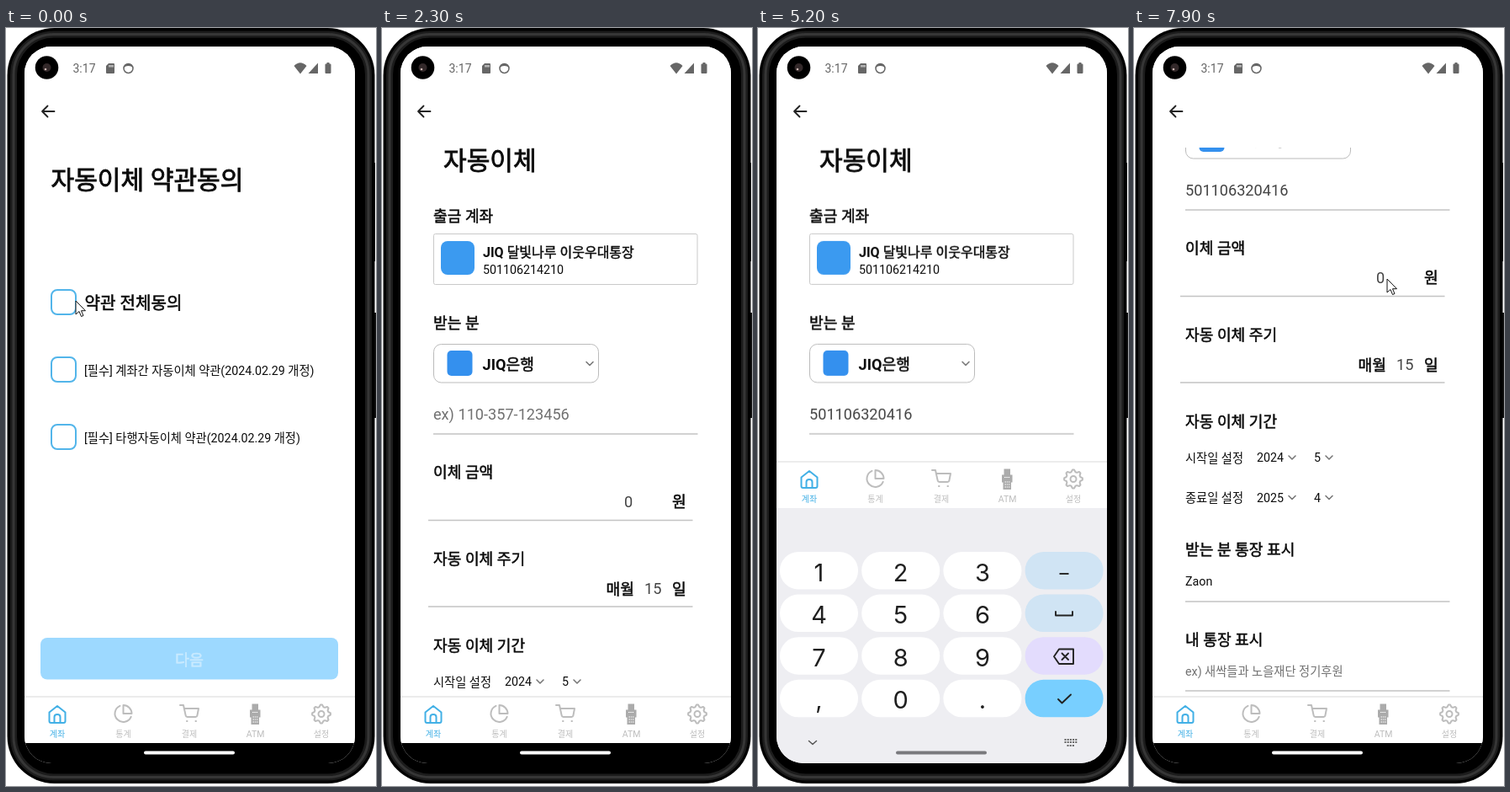
Animation of 440 by 900 pixels, one loop 8000 ms. Source, as an HTML page:

```html
<!DOCTYPE html>
<html lang="ko">
<head>
<meta charset="utf-8">
<title>자동이체</title>
<style>
html, body { margin: 0; width: 100%; height: 100%; overflow: hidden; background: #fff; }
svg { display: block; width: 440px; height: 900px; font-family: Roboto, "Noto Sans CJK KR", "Noto Sans CJK", sans-serif; }
text { --ink: #0c0c0c; fill: var(--ink); white-space: pre; }
/* Medium weight: regular glyphs with a thin outline */
.medium { stroke: var(--ink); stroke-width: .028em; }
.medium tspan { font-weight: 700; stroke: none; }
.s30 { font-size: 30.1px; }
.s20 { font-size: 20.1px; }
.s18 { font-size: 18.15px; }
.s16 { font-size: 16px; }
.s14 { font-size: 14.25px; }
.thin { font-size: 18.15px; --ink: #444; }
.hint { --ink: #717171; }
.next { font-size: 18.5px; --ink: #fff; }
.off { --ink: #c9eaff; }
.mid { text-anchor: middle; }
.key { font: 29px Inter, Roboto, sans-serif; --ink: #1f1f1f; }
.rule { stroke: #c4c4c4; stroke-width: 1.3; }
.line { fill: none; stroke-linecap: round; stroke-linejoin: round; }
.box { fill: #fff; stroke: #c9c9c9; }
.tab { font-size: 10px; text-anchor: middle; --ink: #bdbdbd; }
.active { --ink: #42b0e6; }

.anim, .cursor { animation: 8s linear infinite; }
.step { animation-timing-function: step-end; }
.tick { animation-name: tick; }
.press { animation-name: press; }
.form { animation-name: form; }
.scroll { animation-name: scroll; }
.hint-in { animation-name: hint; }
.typed { animation-name: typed; }
.caret { animation-name: caret; }
.resize { animation-name: resize; }
.tabs { animation-name: tabs; }
.keyboard { animation-name: keyboard; }
.chip { animation-name: chip; }
.handle { animation-name: handle; }
.cursor { animation-name: move, seen; animation-timing-function: linear, step-end; }

@keyframes tick { 0% { opacity: 0 } 1.875%, 100% { opacity: 1 } }
@keyframes press { 0%, 17% { opacity: 1 } 18.5%, 20% { opacity: .5 } 21.25%, 100% { opacity: 1 } }
@keyframes form { 0%, 20.6% { opacity: 0 } 25.6%, 100% { opacity: 1 } }
@keyframes scroll {
  0%, 65% { transform: translateY(0); animation-timing-function: cubic-bezier(.3, .1, .3, 1) }
  72.5%, 100% { transform: translateY(-266px) }
}
@keyframes hint { 0% { opacity: 1 } 57.5%, 100% { opacity: 0 } }
@keyframes typed { 0% { opacity: 0 } 57.5%, 100% { opacity: 1 } }
@keyframes caret {
  0% { opacity: 0; transform: translateX(-122px) }
  43.75% { opacity: 1; transform: translateX(-122px) }
  50% { opacity: 0; transform: translateX(-122px) }
  57.5% { opacity: 1; transform: none }
  62.5% { opacity: 0; transform: none }
  68.75% { opacity: 1; transform: none }
  75.6% { opacity: 0; transform: none }
  81.25% { opacity: 1; transform: none }
  87.5%, 100% { opacity: 0; transform: none }
}
@keyframes resize { 0% { opacity: 0 } 43.125% { opacity: 1 } 91.875%, 100% { opacity: 0 } }
@keyframes tabs {
  0% { transform: translateY(0) }
  43.125% { transform: translateY(-279px) }
  89.375%, 100% { transform: translateY(0) }
}
@keyframes keyboard {
  0%, 43.125% { opacity: 0; transform: translateY(60px) }
  47.5%, 88.75% { opacity: 1; transform: translateY(0) }
  90% { opacity: .74; transform: translateY(15px) }
  92.5%, 100% { opacity: 0; transform: translateY(60px) }
}
@keyframes chip { 0% { opacity: 0 } 49.4% { opacity: 1 } 57.5%, 100% { opacity: 0 } }
@keyframes handle {
  0%, 43.125% { fill: #fff }
  47.5%, 58.75% { fill: #b9b9bd }
  67.5%, 90% { fill: #5f5f63 }
  93.75%, 100% { fill: #fff }
}
@keyframes move {
  0%, 3.75% { transform: translate(83px, 324px); animation-timing-function: ease-in-out }
  11.25%, 21.25% { transform: translate(227px, 751px) }
  42%, 45% { transform: translate(215px, 445px); animation-timing-function: ease-in-out }
  52.5%, 62.5% { transform: translate(218px, 579px) }
  78%, 79% { transform: translate(165px, 630px) }
  82.5% { transform: translate(355px, 420px) }
  86.25%, 93.75% { transform: translate(305px, 311px) }
  97.5% { transform: translate(304px, 304px) }
  98.75%, 100% { transform: translate(301px, 298px) }
}
@keyframes seen {
  0% { opacity: 1 } 21.25% { opacity: 0 } 42.5% { opacity: 1 }
  62.5% { opacity: 0 } 78.75%, 100% { opacity: 1 }
}
</style>
</head>
<body>
<svg viewBox="0 0 440 900">
  <defs>
    <clipPath id="screen"><rect x="22" y="22" width="393" height="851" rx="32"/></clipPath>
    <path id="down" class="line" d="M-4-2L0 2L4-2" stroke="#777" stroke-width="1.6"/>
  </defs>

  <!-- phone body -->
  <path d="M437 160h2v117h-2zM437 338h3v125h-3z" fill="#111"/>
  <rect x="1.5" width="437" height="897" rx="56" fill="#000"/>
  <g fill="none">
    <rect x="9" y="7.5" width="422" height="882" rx="48" stroke="#1c1c1c" stroke-width="8"/>
    <rect x="9" y="7.5" width="422" height="882" rx="48" stroke="#363636" stroke-width="3"/>
  </g>

  <g clip-path="url(#screen)">
    <rect x="22" y="22" width="393" height="851" fill="#fff"/>

    <!-- terms page -->
    <text class="s30 medium" x="53.500" y="191">자동이체 약관동의</text>
    <g id="boxes"></g>
    <text class="s20 medium" x="93.500" y="333.5">약관 전체동의</text>
    <text class="s14" x="93" y="412">[필수] 계좌간 자동이체 약관(2024.02.29 개정)</text>
    <text class="s14" x="93" y="492">[필수] 타행자동이체 약관(2024.02.29 개정)</text>
    <rect x="41" y="724" width="354" height="49.5" rx="8" fill="#9dd9ff"/>
    <text class="next off medium mid" x="218" y="756.5">다음</text>
    <g class="anim step tick"><g class="anim press">
      <rect x="41" y="724" width="354" height="49.5" rx="8" fill="#42b4ff"/>
      <text class="next medium mid" x="218" y="756.5">다음</text>
    </g></g>

    <!-- transfer form -->
    <g class="anim form">
      <rect x="22" y="120" width="393" height="674" fill="#fff"/>
      <g class="anim scroll">
        <text class="s30 medium" x="73" y="168">자동이체</text>
        <text class="s18 medium" x="61" y="229.5">출금 계좌</text>
        <rect class="box" x="61.5" y="244.5" width="313.5" height="60" rx="2"/>
        <rect x="70" y="253" width="40" height="40" rx="8" fill="#3b9af0"/>
        <text class="s16 medium" x="120" y="271.5"><tspan>JIQ</tspan> 달빛나루 이웃우대통장</text>
        <text class="s14" x="120" y="292.3">501106214210</text>
        <text class="s18 medium" x="61" y="357">받는 분</text>
        <rect class="box" x="61.5" y="375.5" width="196" height="45.5" rx="9" style="stroke:#bbb"/>
        <rect x="77.5" y="383" width="30" height="30" rx="5" fill="#3490ee"/>
        <text class="s18 medium" x="119.5" y="406"><tspan>JIQ</tspan>은행</text>
        <use href="#down" x="247" y="398.5"/>
        <text class="thin hint anim step hint-in" x="61" y="464.5">ex) 110-357-123456</text>
        <text class="thin anim step typed" x="61" y="465">501106320416</text>
        <rect class="anim step caret" x="183" y="444" width="2.2" height="28" fill="#25c3c8"/>
        <path class="rule" d="M61 482H375.500M55 584.500H369.500M55 687H369.500M61 947H375.500M61 1053H375.500"/>
        <text class="s18 medium" x="61" y="533.5">이체 금액</text>
        <text class="thin" x="288" y="569">0</text>
        <text class="s18 medium" x="345" y="569">원</text>
        <text class="s18 medium" x="61" y="637">자동 이체 주기</text>
        <text class="s18 medium" x="266.500" y="672.5">매월</text>
        <text class="thin" x="312" y="672">15</text>
        <text class="s18 medium" x="345" y="672.5">일</text>
        <text class="s18 medium" x="61" y="739.5">자동 이체 기간</text>
        <text class="s14" x="61" y="782">시작일 설정</text>
        <text class="s14" x="146" y="781">2024</text><use href="#down" x="188" y="776"/>
        <text class="s14" x="214" y="781">5</text><use href="#down" x="232" y="776"/>
        <text class="s14" x="61" y="829">종료일 설정</text>
        <text class="s14" x="146" y="828.5">2025</text><use href="#down" x="188" y="823.5"/>
        <text class="s14" x="214" y="828.5">4</text><use href="#down" x="232" y="823.5"/>
        <text class="s18 medium" x="61" y="892">받는 분 통장 표시</text>
        <text class="s14" x="61" y="928">Zaon</text>
        <text class="s18 medium" x="61" y="998.5">내 통장 표시</text>
        <text class="s14 hint" x="61" y="1035">ex) 새싹들과 노을재단 정기후원</text>
      </g>
    </g>

    <!-- header -->
    <rect x="22" y="22" width="393" height="120" fill="#fff"/>
    <path class="line" d="M57.500 99H43M49.500 92.500L43 99L49.500 105.500" stroke="#222" stroke-width="1.8"/>
    <circle cx="48.500" cy="47" r="13.800"/>
    <circle cx="48.500" cy="47" r="5" fill="#33292a"/>
    <circle cx="47" cy="49" r="1.300" fill="#c9b5b0"/>
    <g fill="#666">
      <text x="79.500" y="53" font-size="14" style="--ink:#666">3:17</text>
      <path d="M122 42h6q1 0 1 1v10q0 1-1 1h-8q-1 0-1-1v-8z"/>
      <path d="M350 54.500L342.500 45Q350 37.500 357.500 45zM371 41.500V54H359.500zM380.500 42.500h1v-1.500h3v1.500h1q1 0 1 1v9.500q0 1-1 1h-5q-1 0-1-1v-9.500q0-1 1-1z"/>
      <path d="M123 44v2.500M125 44v2.500M127 44v2.500" stroke="#fff"/>
      <circle cx="145.500" cy="48" r="5.500" fill="none" stroke="#666" stroke-width="1.500"/>
      <path d="M140 48a5.500 5.500 0 0 1 11 0q-1-3-5.500-3t-5.500 3z"/>
    </g>

    <rect class="anim step resize" x="22" y="515" width="393" height="334" fill="#f1f1f1"/>
    <rect x="22" y="849" width="393" height="24"/>

    <!-- tab bar -->
    <g class="anim step tabs">
      <rect x="22" y="793" width="393" height="2" fill="#ececec"/>
      <rect x="22" y="795" width="393" height="54" fill="#fff"/>
      <g class="line" stroke="#bdbdbd" stroke-width="2">
        <path transform="translate(49 803)" stroke="#42b0e6" d="M2.500 9.500L12 2l9.500 7.500V20q0 2-2 2h-15q-2 0-2-2zM8.500 22v-7q0-3 3.500-3t3.500 3v7"/>
        <path transform="translate(127.500 802)" d="M21.200 15.900A10 10 0 1 1 8 2.800M22 12A10 10 0 0 0 12 2v10z"/>
        <path transform="translate(206 802)" d="M1 2h4l2.700 12.400q.3 1.600 2 1.600h9.700q1.700 0 2-1.600L23 6H6M9 21h.5M19.500 21h.5"/>
        <path id="gear"/>
        <circle cx="375" cy="814.500" r="3.500"/>
      </g>
      <path d="M292.500 802.500h7.500v7h2.500v9h-1.500v8.500h-9.500v-8.500h-1.500v-9h2.500z" fill="#ababab"/>
      <path d="M293 812.500h7M293.500 818h6M293.500 821h6M293.500 824h6" stroke="#fff" stroke-width="1.200" stroke-dasharray="1.500 .8"/>
      <text class="tab active" x="61" y="841.500">계좌</text>
      <text class="tab" x="139.500" y="841.500">통계</text>
      <text class="tab" x="218" y="841.500">결제</text>
      <text class="tab" x="296.500" y="841.500" style="font-size:10.500px">ATM</text>
      <text class="tab" x="375" y="841.500">설정</text>
    </g>

    <!-- keyboard -->
    <g class="anim keyboard">
      <rect x="22" y="570" width="393" height="310" fill="#eeeef2"/>
      <g class="anim step chip">
        <rect x="132" y="571" width="138" height="42" fill="#e6e6e9"/>
        <rect x="132.500" y="576.500" width="137" height="31" rx="7" fill="#f0f0f2" stroke="#c6c6ca"/>
        <path class="line" d="M142 592v-6h3M153 586h3v6M142 598v2h2M146 585h6v3h-6z" stroke="#4aaee6" stroke-width="1.600"/>
        <text x="143.500" y="599" font-size="8" font-weight="700" style="--ink:#4aaee6">123</text>
        <text class="key" x="163.500" y="597.500" style="font-size:13.400px">501106320416</text>
      </g>
      <g id="keys"></g>
      <g class="line" stroke="#222" stroke-width="1.900">
        <path d="M358.500 648h11" stroke-linecap="butt"/>
        <path d="M354 693v4.500h20V693"/>
        <path d="M358 737.500h17v17.500h-17l-6-8.700zM361.500 742.500l7.500 7.500M369 742.500l-7.500 7.500"/>
        <path d="M357 797l4.500 4.500L372 791.500"/>
      </g>
      <path class="line" d="M60.500 846.500l4.500 4 4.500-4" stroke="#555" stroke-width="1.500"/>
      <path d="M364.500 845h15M364.500 848h15M367.500 852h9" stroke="#666" stroke-width="2" stroke-dasharray="2 1.200"/>
    </g>
    <rect class="anim handle" x="164" y="858.500" width="108" height="4" rx="2"/>
  </g>

  <path class="cursor" d="M0 0V16L4 12.500L6.500 18.500L9 17.500L6.500 11.700H11.500Z" fill="#fff" stroke="#111"/>
</svg>
<script>
const put = (id, html) => { document.getElementById(id).innerHTML = html; };

put('boxes', [311, 391, 471].map(y => `
  <rect x="54" y="${y}" width="29" height="29" rx="7" fill="#fff" stroke="#52b5ea" stroke-width="2"/>
  <g class="anim step tick">
    <rect x="53" y="${y - .5}" width="31" height="30.500" rx="7" fill="#42b4ff"/>
    <path d="M58.500 ${y + 16}l6.500 6.500L78.500 ${y + 8.5}" fill="none" stroke="#fff" stroke-width="4"/>
  </g>`).join(''));

const labels = ['1', '2', '3', '', '4', '5', '6', '', '7', '8', '9', '', ',', '0', '.', ''];
const tints = ['#d0e4f4', '#d0e4f4', '#e3dcfd', '#78cfff'];
put('keys', labels.map((label, i) => {
  const col = i % 4, row = i >> 2;
  const x = 26 + col * 97.2, y = 622 + row * 50.6;
  return `<rect x="${x}" y="${y}" width="93" height="44.500" rx="22" fill="${col < 3 ? '#fff' : tints[row]}"/>
    <text class="key mid" x="${x + 46.5}" y="${y + 34.5}">${label}</text>`;
}).join(''));

// Gear outline: eight rounded teeth
const teeth = 8, points = [];
for (let i = 0; i < teeth * 4; i++) {
  const angle = (i - .5) / (teeth * 4) * 2 * Math.PI;
  const r = i % 4 < 2 ? 11 : 8.6;
  points.push((375 + r * Math.cos(angle)).toFixed(1) + ' ' + (814.5 + r * Math.sin(angle)).toFixed(1));
}
document.getElementById('gear').setAttribute('d', 'M' + points.join('L') + 'Z');
</script>
</body>
</html>
```
